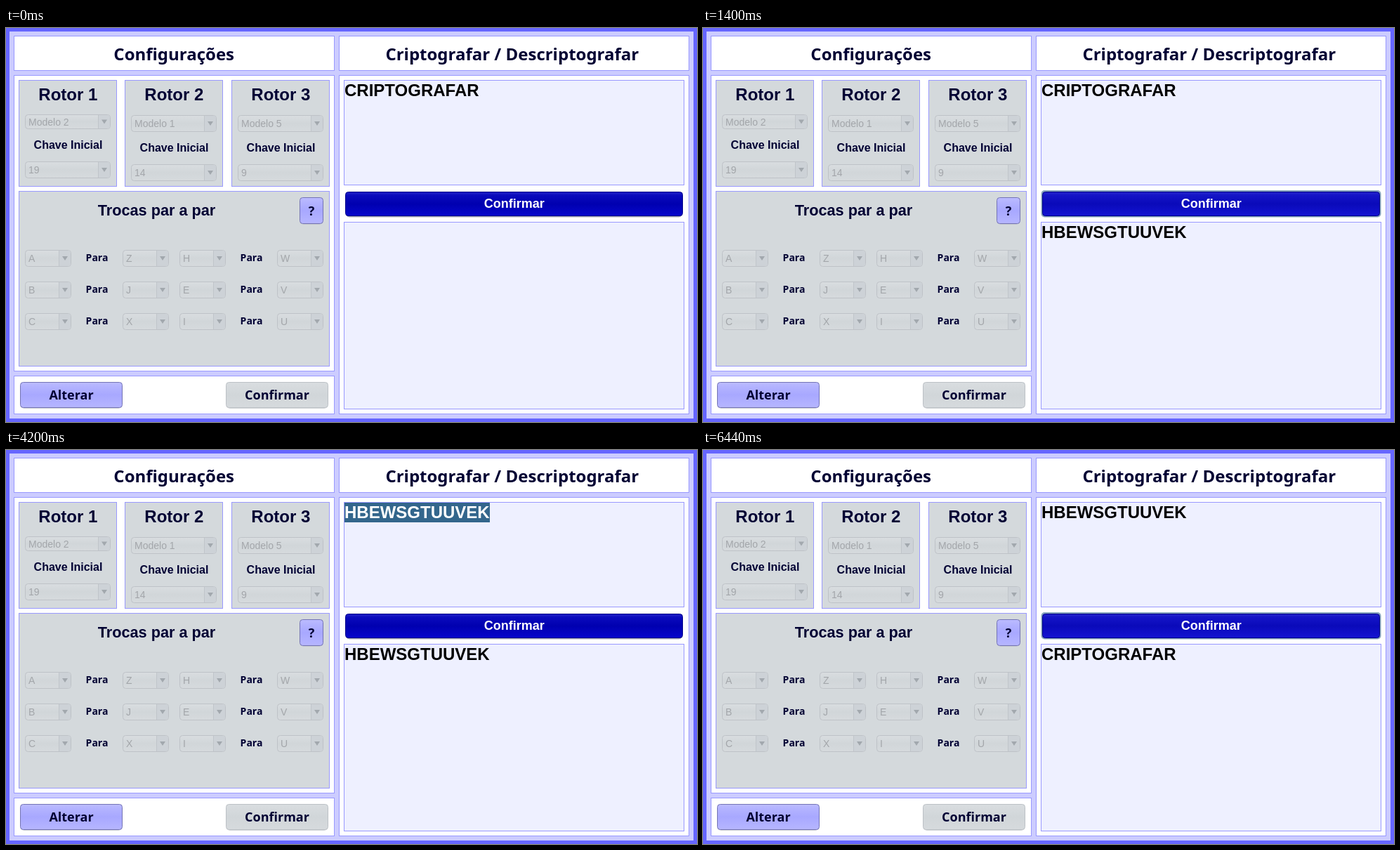
An HTML page that plays this animation: 984 by 561 pixels, repeating every 7 s.

```html
<!DOCTYPE html>
<html lang="pt">
<head>
<meta charset="utf-8">
<style>
  html, body { margin: 0; width: 100%; height: 100%; overflow: hidden; background: #ccf; }
  svg { display: block; width: 984px; height: 561px; }
  text { fill: #003; font: bold 24px "Liberation Sans", Arial, sans-serif; white-space: pre; }
  .ui { font-family: "Noto Sans", "Open Sans", sans-serif; }
  .mid { text-anchor: middle; }
  .off { font-size: 14px; font-weight: normal; fill: #a3a6aa; }
</style>
</head>
<body>
<svg id="stage" viewBox="0 0 984 561" xmlns="http://www.w3.org/2000/svg">
  <defs>
    <linearGradient id="lilac" x2="0" y2="1">
      <stop stop-color="#bcbcff"/><stop offset=".2" stop-color="#b2b2ff"/>
      <stop offset=".5" stop-color="#a8a8ff"/><stop offset="1" stop-color="#b6b6ff"/>
    </linearGradient>
    <linearGradient id="grey" x2="0" y2="1">
      <stop stop-color="#d9dde0"/><stop offset=".5" stop-color="#d1d6d9"/><stop offset="1" stop-color="#d6dadd"/>
    </linearGradient>
    <linearGradient id="navy" x2="0" y2="1">
      <stop stop-color="#2020c8"/><stop offset=".15" stop-color="#0a0abc"/>
      <stop offset=".5" stop-color="#0000b0"/><stop offset="1" stop-color="#0606cc"/>
    </linearGradient>
    <linearGradient id="navyFocus" x2="0" y2="1">
      <stop stop-color="#2424cc"/><stop offset=".15" stop-color="#1414c6"/>
      <stop offset=".5" stop-color="#0a0aba"/><stop offset="1" stop-color="#1414d2"/>
    </linearGradient>
  </defs>
</svg>
<script>
const stage = document.getElementById('stage');

function add(tag, attrs, content = '') {
  const node = document.createElementNS(stage.namespaceURI, tag);
  for (const key in attrs) node.setAttribute(key, attrs[key]);
  node.textContent = content;
  return stage.appendChild(node);
}

const rect = (x, y, width, height, fill, more) => add('rect', { x, y, width, height, fill, ...more });

// Outlined box spanning whole pixels from (x, y) to (x2, y2).
const box = (x, y, x2, y2, fill, stroke = '#9999ff', rx = 0) =>
  rect(x + .5, y + .5, x2 - x - 1, y2 - y - 1, fill, { stroke, rx });

const label = (content, x, y, size, cls = 'mid') =>
  add('text', { x, y, class: cls, style: size ? `font-size:${size}px` : '' }, content);

function combo(content, x, y, width, height = 24) {
  const right = x + width, mid = y + height / 2;
  box(x, y, right, y + height, 'url(#grey)', '#bec2c7', 4);
  add('path', {
    d: `M${right - 17} ${y + 1}H${right - 4}q3 0 3 3V${y + height - 4}q0 3-3 3H${right - 17}z`,
    fill: '#cdd2d7'
  });
  rect(right - 18, y + 1, 1, height - 2, '#c0c5ca');
  add('path', { d: `M${right - 13} ${mid - 3}h8l-4 6z`, fill: '#a2a8ae' });
  label(content, x + 5, mid + 5, 0, 'off');
}

function button(content, x, y, x2, y2, fill, stroke) {
  rect(x + 1, y + 2, x2 - x - 2, y2 - y - 1, '#b9bdc4', { rx: 5, opacity: .6 });
  box(x, y, x2, y2, fill, stroke, 4);
  label(content, (x + x2) / 2, (y + y2) / 2 + 6.5, 18, 'ui mid');
}

rect(2.5, 2.5, 979, 556, '#ccccff', { stroke: '#6666ff', 'stroke-width': 5 });
box(11, 11, 468, 61, '#fff');
box(474, 11, 973, 61, '#fff');
box(11, 67, 468, 489, '#fff');
box(11, 495, 468, 550, '#fff');
box(474, 67, 973, 550, '#fff');
label('Configurações', 239.2, 46, 24, 'ui mid');
label('Criptografar / Descriptografar', 720.8, 46, 24, 'ui mid');

const panel = '#d4d9dc';
[[18, 2, 19], [169, 1, 14], [321, 5, 9]].forEach(([x, model, key], i) => {
  const drop = i ? 4 : 0;
  box(x, 74, x + 140, 226, panel);
  label(`Rotor ${i + 1}`, x + 70.3, 103);
  combo(`Modelo ${model}`, x + 9, i ? 124 : 123, 122, i ? 24 : 21);
  label('Chave Inicial', x + 70.5, 172 + drop, 16);
  combo(key, x + 9, 190 + drop, 122);
});

box(18, 232, 461, 482, panel);
label('Trocas par a par', 214.5, 267, 21.7);
button('?', 418, 241, 452, 279, 'url(#lilac)', '#7474b4');
['AZHW', 'BJEV', 'CXIU'].forEach((letters, row) => {
  const y = 316 + row * 45;
  [27, 166, 247, 386].forEach((x, i) => combo(letters[i], x, y, 66));
  [129.5, 349.5].forEach(x => label('Para', x, y + 16, 14, 'ui mid'));
});

button('Alterar', 20, 504, 166, 541, 'url(#lilac)', '#7474b4');
button('Confirmar', 313, 504, 459, 541, 'url(#grey)', '#bcc1c6');

box(481, 74, 966, 224, '#eef0ff');
box(481, 276, 966, 543, '#eef0ff');
const ring = rect(481.5, 231, 484, 38.5, '#86a4bd', { rx: 5 });
const shadow = rect(484, 235, 479, 34.5, '#a9adbb', { rx: 5 });
const confirm = box(483, 233, 964, 268, 'url(#navy)', '#000088', 4);
label('Confirmar', 723.7, 256, 18).style.fill = '#fff';

function field(top) {
  const mark = rect(482, top, 207, 28, '#33668c');
  const line = label('', 482, top + 22, 24, '');
  return (content, selected) => {
    mark.style.display = selected ? '' : 'none';
    line.textContent = content;
    line.style.fill = selected ? '#fff' : '#000';
  };
}
const setInput = field(75);
const setOutput = field(277);

const plain = 'CRIPTOGRAFAR', cipher = 'HBEWSGTUUVEK';
const steps = [
  { input: plain, output: '' },
  { input: plain, output: cipher, focus: true },
  { input: plain, output: cipher, selected: 'output' },
  { input: cipher, output: cipher, selected: 'input' },
  { input: cipher, output: plain, focus: true }
];
const stepTime = 1400;
let shown;

function render(time) {
  const step = steps[Math.floor(time / stepTime) % steps.length];
  if (step === shown) return;
  shown = step;
  setInput(step.input, step.selected === 'input');
  setOutput(step.output, step.selected === 'output');
  ring.style.display = step.focus ? '' : 'none';
  shadow.style.display = step.focus ? 'none' : '';
  confirm.setAttribute('fill', step.focus ? 'url(#navyFocus)' : 'url(#navy)');
}

const start = performance.now();
function tick() {
  render(performance.now() - start);
  requestAnimationFrame(tick);
}
tick();
</script>
</body>
</html>
```
